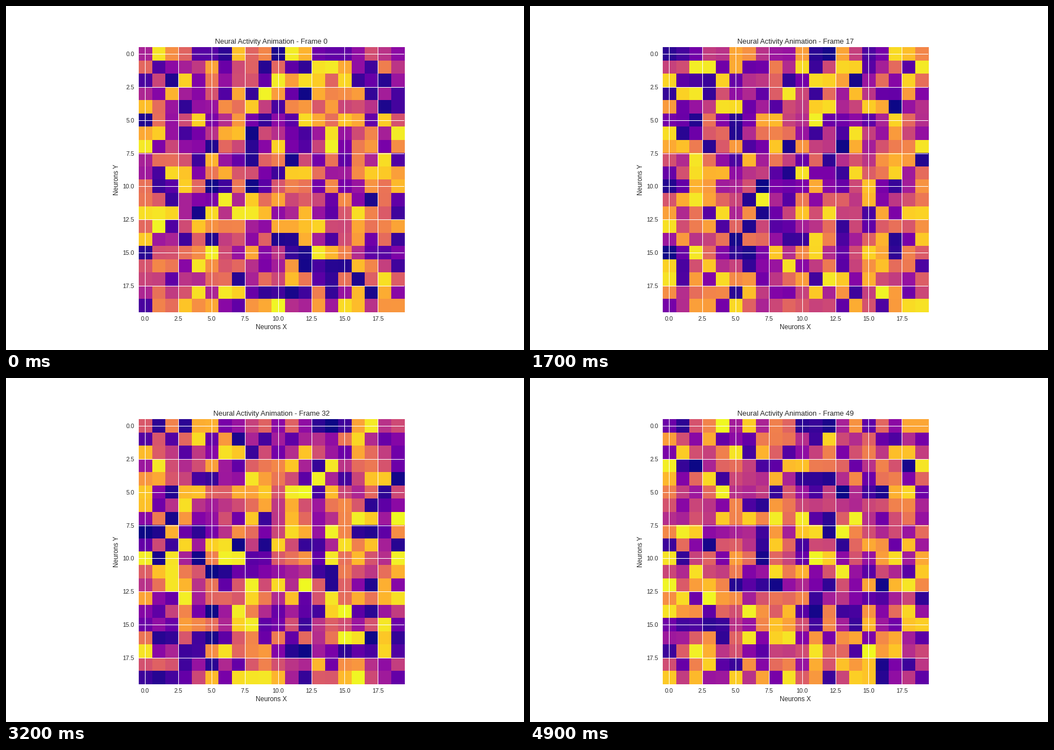
A matplotlib script for the animation above (5 s loop, 917 by 611 pixels).

```python
import numpy as np
import matplotlib.pyplot as plt
from matplotlib.animation import FuncAnimation

WIDTH, HEIGHT, DPI = 917, 611, 76.4
FRAMES, INTERVAL = 50, 100
GRID_SIZE = 20

plt.style.use("seaborn-v0_8")
plt.rcParams["font.family"] = "Liberation Sans"

# Independent uniform firing levels for every time step.
levels = np.random.RandomState(42).rand(FRAMES, GRID_SIZE, GRID_SIZE)

# The small margin keeps the pixel size from being floored one short.
fig, ax = plt.subplots(
    figsize=((WIDTH + 0.01) / DPI, (HEIGHT + 0.01) / DPI), dpi=DPI)
image = ax.imshow(levels[0], cmap="plasma", vmin=0, vmax=1,
                  interpolation="nearest")
title = ax.set_title("")
ax.set_xlabel("Neurons X")
ax.set_ylabel("Neurons Y")


def update(frame):
    image.set_data(levels[frame])
    title.set_text(f"Neural Activity Animation - Frame {frame}")
    return image, title


anim = FuncAnimation(fig, update, frames=FRAMES, interval=INTERVAL,
                     repeat=True, repeat_delay=0, blit=False)
plt.show()
```
